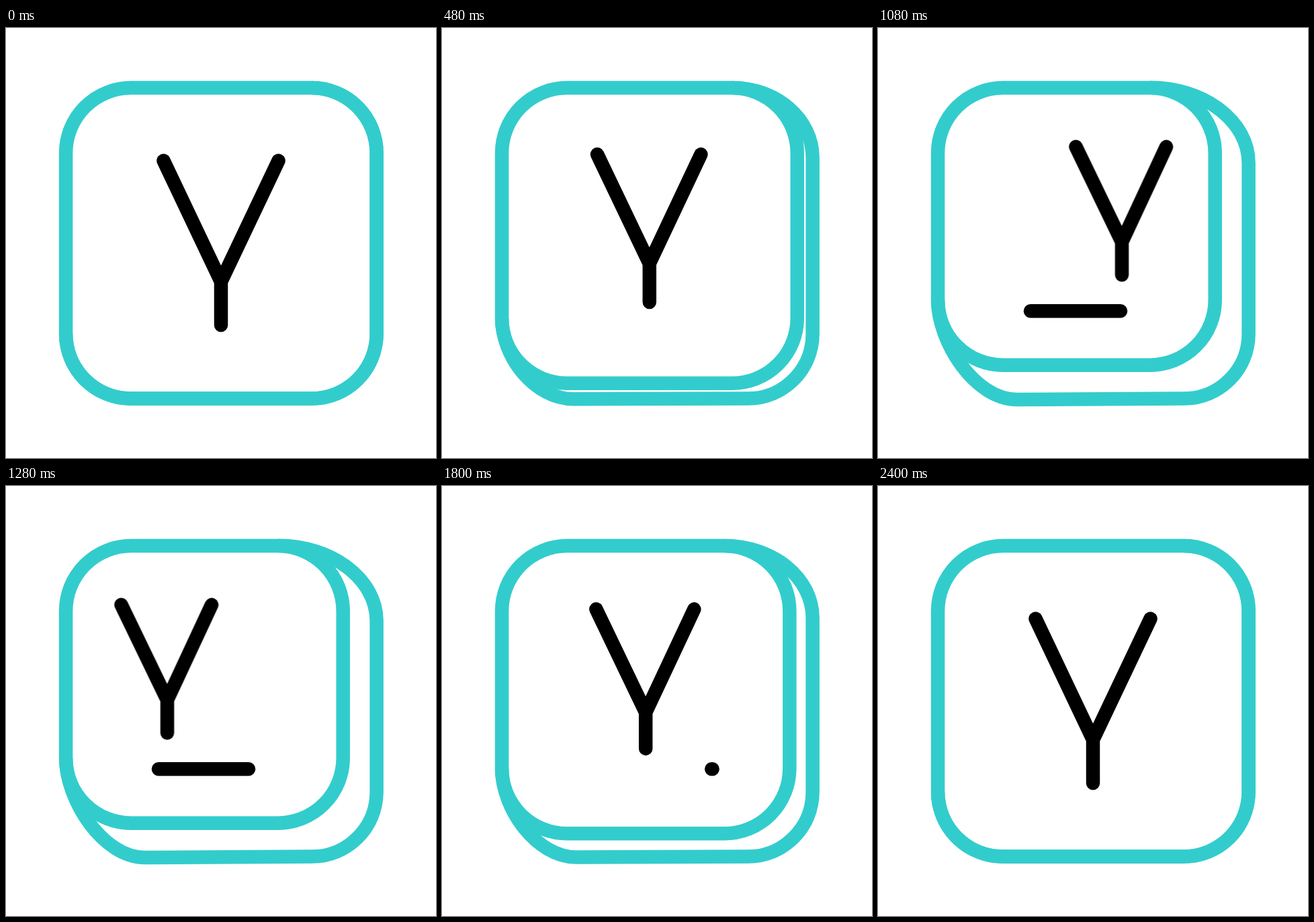
Write an HTML page without scripts that moves like this. It is 640x640 px and loops after 2480 ms.

```html
<!DOCTYPE html>
<html lang="en">
<head>
<meta charset="utf-8">
<title>Y key</title>
<style>
  html, body { margin: 0; width: 100%; height: 100%; overflow: hidden; background: #fff; }
  svg { display: block; width: 100%; height: 100%; }

  svg * {
    --ease: cubic-bezier(.333, 0, .667, 1);
    fill: none;
    stroke-width: 20.5px;
    stroke-linecap: round;
    stroke-linejoin: round;
    animation: 2.48s var(--ease) infinite;
  }
  g { stroke: #000; }
  .face, .side { stroke: #3cc; }

  .face { animation-name: face; }
  .side { stroke-linecap: butt; animation-name: side; }
  .letter { animation-name: letter; }
  .slide { animation-name: slide; }
  .line { stroke: #000; animation-name: line, show; }

  /* pressed between 33.87% and 62.1% */
  @keyframes face {
    0%, 6.45%, 90.32%, 100% { width: 462.5px; height: 462.5px; }
    33.87%, 62.1% { width: 412.6px; height: 412.6px; }
  }
  @keyframes side {
    0%, 6.45%, 90.32%, 100% {
      d: path("M455 89.1 C508.5 89.1 551.6 132.5 551.6 186 L551.6 455 C551.6 508.5 508.5 551.6 455 551.6 L186 551.6 C132.5 551.6 89.1 508.5 89.1 455");
    }
    33.87%, 62.1% {
      d: path("M405 88.8 C486 88.8 551.6 139 551.6 201 L551.6 455 C551.6 508.5 508.5 551.6 455 551.6 L207 553 C144 553 89.1 467 89.1 405");
    }
  }
  @keyframes letter {
    0%, 6.45%, 90.32%, 100% { d: path("M234.5 197.5 L320 377.5 L405.5 197.5 M320 377.5 L320 442.3"); }
    33.87%, 62.1% { d: path("M227 176.7 L295.5 318.5 L361.5 176.9 M295.5 318.5 L295.5 367.4"); }
  }
  @keyframes slide {
    0%, 34.07%, 63.1%, 100% { transform: translateX(0); }
    43.75% { transform: translateX(67.5px); }
    53.43% { transform: translateX(-67.5px); }
  }
  @keyframes line {
    0%, 19.76% { d: path("M227 421.3 L227.1 421.3"); }
    33.27% { d: path("M227 421.3 L361 421.3"); }
    54.72% { d: path("M227 421.3 L361 421.3"); animation-timing-function: cubic-bezier(.4, 0, .8, .6); }
    59.68% { d: path("M257 421.3 L361 421.3"); animation-timing-function: cubic-bezier(.35, .4, .67, 1); }
    73.79%, 100% { d: path("M403 421.3 L403.1 421.3"); }
  }
  @keyframes show {
    0%, 19.75%, 73.8%, 100% { visibility: hidden; }
    19.76%, 73.79% { visibility: visible; }
  }
</style>
</head>
<body>
<svg viewBox="0 0 640 640">
  <path class="side" d="M455 89.1 C508.5 89.1 551.6 132.5 551.6 186 L551.6 455 C551.6 508.5 508.5 551.6 455 551.6 L186 551.6 C132.5 551.6 89.1 508.5 89.1 455"/>
  <rect class="face" x="89.1" y="89.1" width="462.5" height="462.5" rx="97"/>
  <g class="slide">
    <path class="letter" d="M234.5 197.5 L320 377.5 L405.5 197.5 M320 377.5 L320 442.3"/>
  </g>
  <path class="line" d="M227 421.3 L227.1 421.3"/>
</svg>
</body>
</html>
```
